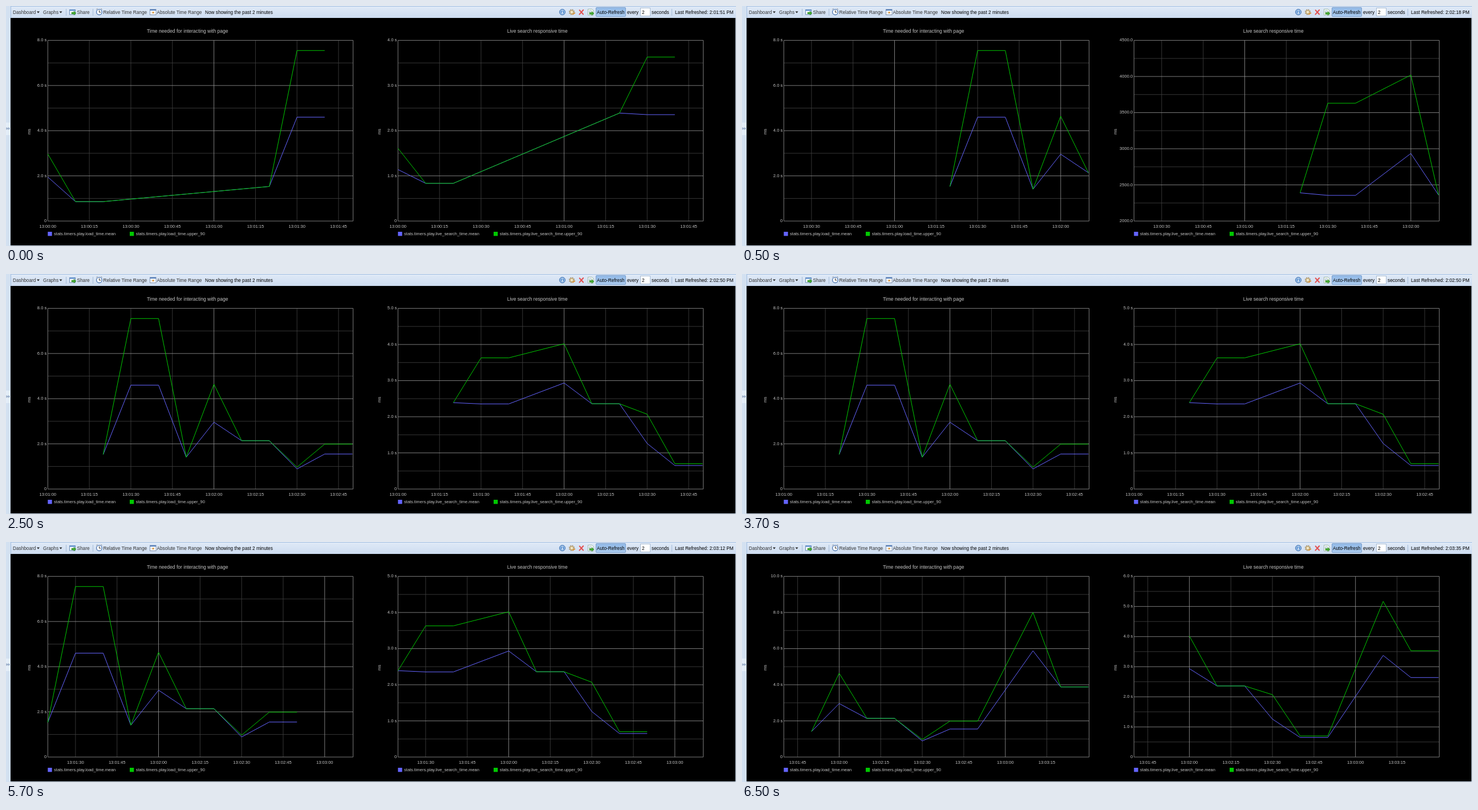
An HTML page for the animation above (8 s loop, 1280x422 px).

```html
<!DOCTYPE html>
<html lang="en">
<head>
<meta charset="utf-8">
<title>Dashboard</title>
<style>
html, body { margin: 0; width: 100%; height: 100%; overflow: hidden; background: #d3e1f1; }
svg { display: block; width: 1280px; height: 422px; font-family: "Liberation Sans", Arial, sans-serif; }
.bar text { font-size: 8.25px; fill: #000; }
.bar .button { fill: #333; }
.plot text { font-size: 7.6px; fill: #c4c4c4; }
.plot .title { font-size: 8.55px; text-anchor: middle; }
.plot .legend { font-size: 7.45px; }
.major { stroke: #929292; stroke-width: .85; }
.minor { stroke: #404040; stroke-width: .85; }
.series { fill: none; stroke-width: 1; stroke-linejoin: round; }
</style>
</head>
<body>
<svg viewBox="0 0 1280 422">
  <defs>
    <linearGradient id="sky" x2="0" y2="1">
      <stop stop-color="#e0eaf7"/><stop offset="1" stop-color="#cddcf0"/>
    </linearGradient>
    <linearGradient id="pressed" x2="0" y2="1">
      <stop stop-color="#93bae7"/><stop offset="1" stop-color="#a9caef"/>
    </linearGradient>
    <path id="arrow" d="M0 2h4V0l4 3.5L4 7V5H0z" fill="#43a832" stroke="#267c1b" stroke-width=".5"/>
    <path id="caret" d="M0 0h5L2.5 3z" fill="#222"/>
    <path id="divider" d="M.5 5v12" stroke="#a5bcd8"/>
  </defs>
  <rect width="1280" height="422" fill="#d3e1f1"/>
  <rect x="8" y="21" width="1271" height="400" fill="#000"/>

  <g class="bar">
    <rect x="8" width="1272" height="21" fill="url(#sky)"/>
    <path d="M8 .5H1280M8.5 0V21" stroke="#a3bfe2" fill="none"/>
    <rect y="205" width="7" height="22" fill="#e3edf8"/>
    <path d="M1 213l2.3 2.5L1 218zM4.2 213l2.3 2.5-2.3 2.5z" fill="#7089ad"/>
    <text class="button" x="12" y="13.7">Dashboard</text>
    <text class="button" x="65" y="13.7">Graphs</text>
    <text class="button" x="124.5" y="13.7">Share</text>
    <text class="button" x="170.5" y="13.7">Relative Time Range</text>
    <text class="button" x="264.5" y="13.7">Absolute Time Range</text>
    <use href="#caret" x="54" y="9.5"/><use href="#caret" x="93.5" y="9.5"/>
    <use href="#divider" x="105"/><use href="#divider" x="152"/><use href="#divider" x="1167"/>
    <text x="349" y="14.2">Now showing the past 2 minutes</text>

    <!-- share -->
    <rect x="111.5" y="6.5" width="10" height="8.5" fill="#f8fbff" stroke="#6b8db8"/>
    <path d="M112 7.5h9" stroke="#5b8ed0" stroke-width="2"/>
    <use href="#arrow" x="115" y="9"/>
    <!-- clock -->
    <circle cx="163.5" cy="10.7" r="4.8" fill="#fff" stroke="#527bb5" stroke-width="1.4"/>
    <path d="M163.5 7.5v3.5h2.8" fill="none" stroke="#333"/>
    <path d="M158.5 6l2-1.5M168.5 6l-2-1.5" stroke="#777"/>
    <!-- calendar -->
    <rect x="252.5" y="6" width="10.5" height="9.5" fill="#fff" stroke="#8193af"/>
    <path d="M252.5 7h10.5" stroke="#4d79b8" stroke-width="2"/>
    <path d="M254 10.5h7M254 13h7" stroke="#b9c7da" stroke-dasharray="1.5 1"/>
    <rect x="256.5" y="10" width="3" height="3" fill="#e2a04a"/>
    <!-- info -->
    <circle cx="975.5" cy="10.7" r="5" fill="#5c93d2" stroke="#3c70b0"/>
    <circle cx="975.5" cy="10.7" r="3.8" fill="none" stroke="#d6e6f8" stroke-width=".8"/>
    <path d="M975.5 7.5v1.3M975.5 9.7v4" stroke="#fff" stroke-width="1.5"/>
    <!-- gear -->
    <circle cx="992" cy="10.7" r="4.4" fill="none" stroke="#a8977a" stroke-width="1.6" stroke-dasharray="2 1.46"/>
    <circle cx="992" cy="10.7" r="3.1" fill="#f0e4c4" stroke="#b9a06a" stroke-width="1.3"/>
    <path d="M993 15l5-3" stroke="#e09436" stroke-width="1.8"/>
    <!-- delete -->
    <path d="M1005.7 7.3l6.4 7.2M1012.2 7l-6.7 7.7" stroke="#e34f4f" stroke-width="2" stroke-linecap="round"/>
    <!-- refresh page -->
    <path d="M1020.5 5.5h7l2.5 2.5v8h-9.5z" fill="#f6faf6" stroke="#8fab9b" stroke-width=".8"/>
    <path d="M1022 8.5h5M1022 10.5h3" stroke="#9ab3ce"/>
    <use href="#arrow" x="1023" y="9.5"/>

    <rect x="1034.5" y="2.5" width="52" height="16" rx="1.5" fill="url(#pressed)" stroke="#7da0cc"/>
    <text x="1036" y="13.7">Auto-Refresh</text>
    <text x="1089" y="14.2">every</text>
    <rect x="1112.5" y="3.5" width="17" height="14" fill="#fff" stroke="#a9bcd2"/>
    <text x="1115" y="14">2</text>
    <text x="1132" y="14.2">seconds</text>
    <text id="clock" x="1173" y="14.2"></text>
  </g>
  <g class="plot" id="left"></g>
  <g class="plot" id="right"></g>
</svg>

<script>
const LOOP = 8000, SPAN = 110, PX_PER_SEC = 4.855;
const BOX = { x: 73.3, top: 60.4, bottom: 378.1, width: 535.3 };
const BLUE = '#6464ff', GREEN = '#00c800';

// Sample times are seconds after 13:00:00; null is a missing sample.
const times = [0, 10, 20, 80, 90, 100, 110, 120, 130, 140, 150, 160, 170, 190, 200, 210];
const charts = [
  {
    id: 'left', dx: 0, title: 'Time needed for interacting with page', titleX: 318.3,
    metric: 'load_time', secondKey: 217,
    mean:  [1.95, .86, .86, 1.53, 4.6, 4.6, 1.41, 2.96, 2.14, 2.14, .89, 1.55, 1.55, 5.88, 3.88, 3.88],
    upper: [2.97, .86, .86, 1.53, 7.55, 7.55, 1.41, 4.64, 2.14, 2.14, .97, 1.99, 1.99, 8, 3.88, 3.88]
  },
  {
    id: 'right', dx: 614, title: 'Live search responsive time', titleX: 931.7,
    metric: 'live_search_time', secondKey: 855,
    mean:  [1.14, .835, .835, 2.39, 2.355, 2.355, null, 2.935, 2.36, 2.36, 1.26, .65, .65, 3.375, 2.64, 2.64],
    upper: [1.61, .835, .835, 2.39, 3.63, 3.63, null, 4.02, 2.36, 2.36, 2.07, .7, .7, 5.17, 3.53, 3.53]
  }
];

// Each refresh: window start, first and last known sample, and [min, max, step] per chart.
const refreshes = [
  { at: 0,    clock: '2:01:51', start: 0,   from: 0,   to: 100, axes: [[0, 8, 2],  [0, 4, 1]] },
  { at: 500,  clock: '2:02:18', start: 20,  from: 80,  to: 130, axes: [[0, 8, 2],  [2, 4.5, .5]] },
  { at: 2500, clock: '2:02:50', start: 60,  from: 80,  to: 170, axes: [[0, 8, 2],  [0, 5, 1]] },
  { at: 4500, clock: '2:03:12', start: 80,  from: 80,  to: 170, axes: [[0, 8, 2],  [0, 5, 1]] },
  { at: 6500, clock: '2:03:35', start: 100, from: 110, to: 210, axes: [[0, 10, 2], [0, 6, 1]] }
];

const line = (x1, y1, x2, y2, kind) => `<path class="${kind}" d="M${x1} ${y1}L${x2} ${y2}"/>`;
const label = (x, y, text, attrs = '') => `<text x="${x}" y="${y}" ${attrs}>${text}</text>`;
const pad = n => String(n).padStart(2, '0');
const timeOfDay = s => `13:${pad(Math.floor(s / 60))}:${pad(s % 60)}`;

function tickText(value, min) {
  if (min > 0) return (value * 1000).toFixed(1);
  return value ? value.toFixed(1) + ' s' : '0';
}

function drawChart(chart, { start, from, to }, [min, max, step]) {
  const left = BOX.x + chart.dx, right = left + BOX.width;
  const xAt = t => left + (t - start) * PX_PER_SEC;
  const yAt = v => BOX.bottom - (v - min) / (max - min) * (BOX.bottom - BOX.top);
  let minor = '', major = '', labels = '';

  for (let i = 0; i <= (max - min) / step * 2; i++) {
    const value = min + i * step / 2, y = yAt(value);
    if (i % 2) {
      minor += line(left, y, right, y, 'minor');
    } else {
      major += line(left, y, right, y, 'major');
      labels += label(left - 2, y + 2, tickText(value, min), 'text-anchor="end"');
    }
  }
  for (let t = Math.ceil(start / 15) * 15; t < start + SPAN; t += 15) {
    const x = xAt(t);
    if (t % 60) minor += line(x, BOX.top, x, BOX.bottom, 'minor');
    else if (t > start) major += line(x, BOX.top, x, BOX.bottom, 'major');
    labels += label(x, 389.5, timeOfDay(t), 'text-anchor="middle"');
  }
  for (const x of [left, right]) major += line(x, BOX.top, x, BOX.bottom, 'major');

  const series = (values, color) => {
    const points = times.map((t, i) => [t, values[i]])
      .filter(([t, v]) => v !== null && t >= from && t <= to)
      .map(([t, v]) => `${xAt(t).toFixed(2)},${yAt(v).toFixed(2)}`);
    return `<polyline class="series" stroke="${color}" points="${points.join(' ')}"/>`;
  };
  const key = (x, color, suffix) =>
    `<rect x="${x}" y="397" width="7.3" height="7.3" fill="${color}"/>` +
    label(x + 10.8, 403, `stats.timers.play.${chart.metric}.${suffix}`, 'class="legend"');

  document.getElementById(chart.id).innerHTML =
    minor + major + series(chart.mean, BLUE) + series(chart.upper, GREEN) + labels +
    label(chart.titleX, 47, chart.title, 'class="title"') +
    label(0, 0, 'ms', `text-anchor="middle" transform="translate(${left - 30} 221) rotate(-90)"`) +
    key(left, BLUE, 'mean') + key(chart.secondKey, GREEN, 'upper_90');
}

let shown;
function update(elapsed) {
  const time = elapsed % LOOP;
  const current = refreshes.filter(r => r.at <= time).pop();
  if (current === shown) return;
  shown = current;
  document.getElementById('clock').textContent = `Last Refreshed: ${current.clock} PM`;
  charts.forEach((chart, i) => drawChart(chart, current, current.axes[i]));
}

const begin = performance.now();
function tick() {
  update(performance.now() - begin);
  requestAnimationFrame(tick);
}
tick();
</script>
</body>
</html>
```
